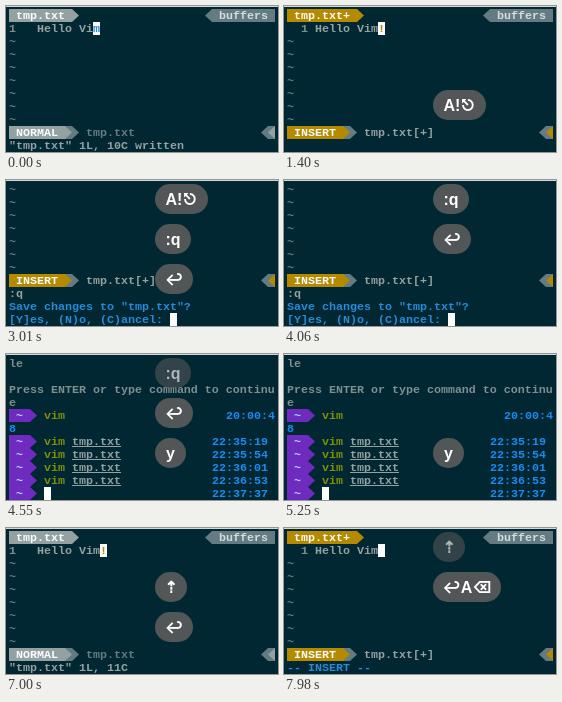
Animation, 272 px wide and 146 px high, one loop 8000 ms. Source, as an HTML page with a canvas:

```html
<!DOCTYPE html>
<html lang="en">
<meta charset="utf-8">
<title>Vim session</title>
<style>
  html, body { margin: 0; width: 100%; height: 100%; overflow: hidden; background: #012832; }
  canvas { display: block; }
</style>
<canvas id="stage" width="272" height="146"></canvas>
<script>
const ctx = document.getElementById('stage').getContext('2d');
const LOOP = 8000, TICK = 70;
const CELL = 7, ROW = 13, PAD = 3;
const MONO = 'bold 11.67px "Liberation Mono", monospace';
const COLOR = {
  bg: '#012832', edge: '#d3d8d9', text: '#7d8f90', dim: '#657b83', light: '#93a1a1',
  gold: '#b58900', white: '#fcfcfc', blue: '#268bd9', time: '#1a8cf5',
  purple: '#6f2abf', green: '#7d9006', tilde: '#a9dcf2'
};

const colX = col => PAD + col * CELL;
const rowY = row => PAD + row * ROW;

function box(col, row, cols, color) {
  ctx.fillStyle = color;
  ctx.fillRect(colX(col), rowY(row), cols * CELL, ROW);
}

function write(text, col, row, color = COLOR.text) {
  ctx.font = MONO;
  ctx.textAlign = 'left';
  ctx.textBaseline = 'alphabetic';
  ctx.fillStyle = color;
  ctx.fillText(text, colX(col), rowY(row) + 10);
}

// Powerline separator filling one cell; dir 1 points right, -1 points left.
function tip(col, row, color, dir = 1) {
  const base = colX(dir > 0 ? col : col + 1), y = rowY(row);
  ctx.fillStyle = color;
  ctx.beginPath();
  ctx.moveTo(base, y);
  ctx.lineTo(base + dir * CELL, y + ROW / 2);
  ctx.lineTo(base, y + ROW);
  ctx.fill();
}

function cursor(col, row, char = '', color = COLOR.blue) {
  box(col, row, 1, COLOR.white);
  write(char, col, row, color);
}

function header(modified) {
  const name = modified ? 'tmp.txt+' : 'tmp.txt';
  const color = modified ? COLOR.gold : COLOR.light;
  box(0, 0, name.length + 2, color);
  tip(name.length + 2, 0, color);
  write(name, 1, 0, COLOR.white);
  tip(28, 0, COLOR.dim, -1);
  box(29, 0, 9, COLOR.dim);
  write('buffers', 30, 0, '#d5dcda');
}

function statusLine(row, insert, modified) {
  const color = insert ? COLOR.gold : COLOR.light;
  box(0, row, 8, color);
  box(8, row, 1, COLOR.dim);
  tip(8, row, color);
  tip(9, row, COLOR.dim);
  write(insert ? 'INSERT' : 'NORMAL', 1, row, COLOR.white);
  write(modified ? 'tmp.txt[+]' : 'tmp.txt', 11, row, insert ? COLOR.light : COLOR.dim);
  tip(36, row, COLOR.dim, -1);
  box(37, row, 1, COLOR.dim);
  tip(37, row, color, -1);
}

function tildes(from, to) {
  for (let row = from; row <= to; row++) write('~', 0, row, COLOR.dim);
}

function editor({ insert, modified, text, at, message = '', messageColor }) {
  header(modified);
  write('1', insert ? 2 : 0, 1, COLOR.text);
  write(text, 4, 1, COLOR.light);
  if (at !== undefined) {
    const char = text[at] || '';
    cursor(4 + at, 1, char, char === '!' ? COLOR.gold : COLOR.blue);
  }
  tildes(2, 8);
  statusLine(9, insert, modified);
  write(message, 0, 10, messageColor || COLOR.light);
}

function commandLine(command) {
  editor({ insert: true, modified: true, text: 'Hello Vim!', message: command });
  cursor(command.length, 10);
}

function savePrompt() {
  tildes(0, 6);
  statusLine(7, true, true);
  write(':q', 0, 8, COLOR.light);
  write('Save changes to "tmp.txt"?', 0, 9, COLOR.blue);
  write('[Y]es, (N)o, (C)ancel: ', 0, 10, COLOR.blue);
  cursor(23, 10);
}

function prompt(row, time, command, file) {
  box(0, row, 3, COLOR.purple);
  tip(3, row, COLOR.purple);
  write('~', 1, row, COLOR.tilde);
  write(command, 5, row, COLOR.green);
  if (file) {
    write(file, 9, row, COLOR.light);
    ctx.fillRect(colX(9), rowY(row) + 11, file.length * CELL, 1);
  }
  write(time, time.length < 8 ? 31 : 29, row, COLOR.time);
}

function shell(typed, scroll = 0) {
  if (!scroll) write('le', 0, 0);
  write('Press ENTER or type command to continu', 0, 2 - scroll);
  write('e', 0, 3 - scroll);
  prompt(4 - scroll, '20:00:4', 'vim');
  write('8', 0, 5 - scroll, COLOR.time);
  ['22:35:19', '22:35:54', '22:36:01', '22:36:53', '22:37:37'].forEach((time, i) => {
    const done = i < 4 || typed;
    prompt(6 + i - scroll, time, done ? 'vim' : '', done ? 'tmp.txt' : '');
  });
  if (scroll) cursor(0, 10);
  else cursor(typed ? 16 : 5, 10);
}

const INSERTING = { message: '-- INSERT --', messageColor: COLOR.blue, insert: true };
const OPENED = '"tmp.txt" 1L, 11C';

const screens = [
  [0, () => editor({ text: 'Hello Vim', at: 8, message: '"tmp.txt" 1L, 10C written' })],
  [420, () => editor({ ...INSERTING, text: 'Hello Vim', at: 9 })],
  [910, () => editor({ ...INSERTING, modified: true, text: 'Hello Vim!', at: 10 })],
  [1400, () => editor({ insert: true, modified: true, text: 'Hello Vim!', at: 9 })],
  [2170, () => commandLine(':')],
  [2450, () => commandLine(':q')],
  [3010, savePrompt],
  [4130, () => shell(false)],
  [5950, () => shell(true)],
  [6230, () => shell(true, 1)],
  [6580, () => write(OPENED, 0, 10, COLOR.light)],
  [7000, () => editor({ text: 'Hello Vim!', at: 9, message: OPENED })],
  [7560, () => editor({ ...INSERTING, text: 'Hello Vim!', at: 10 })],
  [7840, () => editor({ ...INSERTING, modified: true, text: 'Hello Vim', at: 9 })]
];

// Each bubble: when it pushes the others up, when it shows, and its keys [time, label, width].
const bubbles = [
  { start: 420, show: 420, keys: [[420, 'A', 33], [910, 'A!', 37], [1330, 'A!⎋', 53]] },
  { start: 2100, show: 2170, keys: [[2100, ':', 30], [2450, ':q', 36]] },
  { start: 3010, show: 3010, keys: [[3010, '↩', 38]] },
  { start: 4060, show: 4130, keys: [[4060, 'y', 31]] },
  { start: 5880, show: 5950, keys: [[5880, '⇡', 32]] },
  { start: 6160, show: 6230, keys: [[6160, '↩', 38], [7560, '↩A', 50], [7770, '↩A⌫', 68]] },
  { start: 7980, show: LOOP, keys: [[7980, '', 30]] }
];
const HOLD = 2100;

const latest = (list, t) => list.filter(item => item[0] <= t).pop();

function drawBubble({ start, show, keys }, t) {
  if (t < show) return;
  const [, label, width] = latest(keys, t);
  const fadeStart = keys[keys.length - 1][0] + HOLD;
  const alpha = t < fadeStart ? 1 : Math.max(0, 1 - (t - fadeStart + 90) / 230);
  const newer = bubbles.filter(b => b.start > start && b.start <= t).length;
  const y = 84 - 40 * newer;
  ctx.globalAlpha = alpha;
  ctx.fillStyle = '#535657';
  ctx.beginPath();
  ctx.roundRect(149, y, width, 30, 15);
  ctx.fill();
  ctx.font = 'bold 16px "Liberation Sans", Inter, sans-serif';
  ctx.textAlign = 'center';
  ctx.textBaseline = 'alphabetic';
  ctx.fillStyle = '#fff';
  ctx.fillText(label, 149 + width / 2, y + 21);
  ctx.globalAlpha = 1;
}

function draw(now) {
  const t = Math.floor((now % LOOP) / TICK) * TICK;
  ctx.fillStyle = COLOR.bg;
  ctx.fillRect(0, 0, 272, 146);
  ctx.fillStyle = COLOR.edge;
  ctx.fillRect(0, 0, 272, 1);
  latest(screens, t)[1]();
  bubbles.forEach(bubble => drawBubble(bubble, t));
}

const origin = performance.now();
function loop() {
  draw(performance.now() - origin);
  requestAnimationFrame(loop);
}
loop();
</script>
</html>
```
